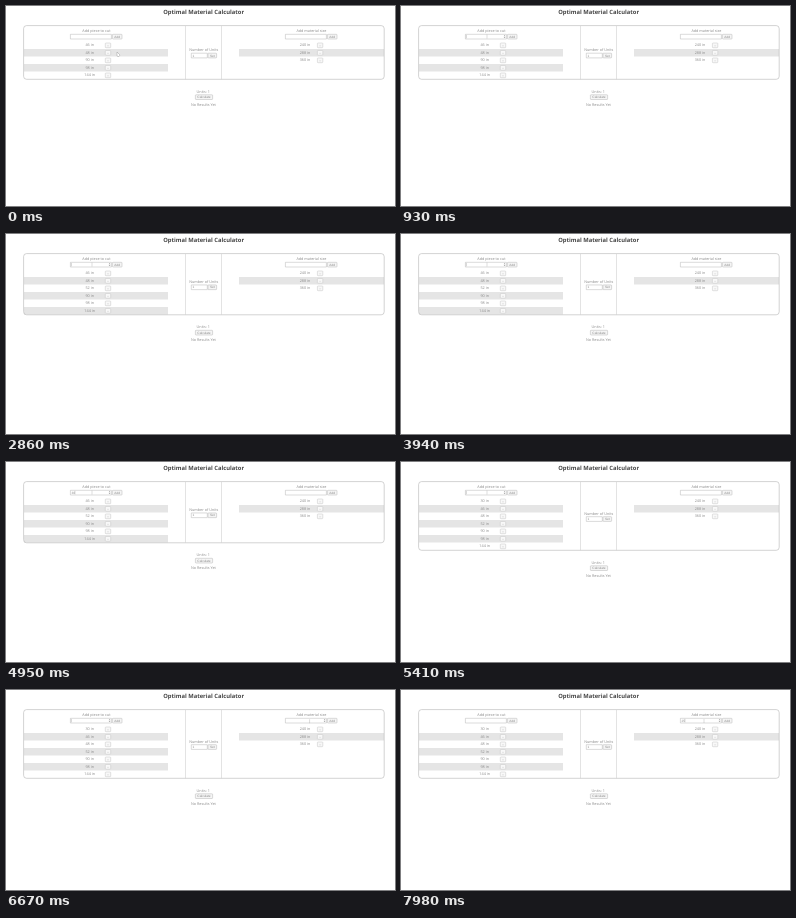
Write an HTML page with a canvas that moves like this. It is 389 px wide and 200 px high and loops after 8000 ms.

```html
<!DOCTYPE html>
<html lang="en">
<head>
<meta charset="utf-8">
<title>Optimal Material Calculator</title>
<style>
  html, body { margin: 0; width: 100%; height: 100%; overflow: hidden; background: #fff; }
  canvas { display: block; width: 389px; height: 200px; }
</style>
</head>
<body>
<canvas id="stage" width="389" height="200"></canvas>
<script>
const ctx = document.getElementById('stage').getContext('2d');
const LOOP = 8000;
const ROW = 7.5;
const BLINK = 530;
const POINTER_STEP = 79;
const UI_FONT = '"Open Sans", "Noto Sans", sans-serif';
const FORM_FONT = '"Liberation Sans", Arial, sans-serif';

const startPieces = [46, 48, 90, 98, 144];
const sizes = [240, 288, 360];
const pieceField = {
  x: 64.4, focus: 930, blur: 7060,
  entries: [
    { value: '52', keys: [2080, 2310], submit: 2860 },
    { value: '30', keys: [4650, 4950], submit: 5410 }
  ]
};
const sizeField = {
  x: 279.4, focus: 7060, blur: LOOP,
  entries: [{ value: '25', keys: [7750, 7980], submit: LOOP }]
};

function fieldState(field, t) {
  const { focus, blur, entries } = field;
  const focused = t >= focus && t < blur;
  const events = [focus, ...entries.flatMap(e => [...e.keys, e.submit])];
  const last = Math.max(...events.filter(time => time <= t));
  const entry = entries.find(e => t < e.submit);
  const typed = entry ? entry.keys.filter(key => key <= t).length : 0;
  return {
    focused,
    value: entry ? entry.value.slice(0, typed) : '',
    caret: focused && Math.floor((t - last) / BLINK) % 2 === 0
  };
}

function piecesAt(t) {
  const added = pieceField.entries.filter(e => e.submit <= t).map(e => +e.value);
  return [...startPieces, ...added].sort((a, b) => a - b);
}

function progress(t, start, duration) {
  const stepped = Math.floor((t - start) / POINTER_STEP + 1) * POINTER_STEP;
  const u = Math.min(1, Math.max(0, stepped / duration));
  return 1 - (1 - u) ** 3;
}

const bezier = (a, b, c, d, u) =>
  a * (1 - u) ** 3 + 3 * b * u * (1 - u) ** 2 + 3 * c * u * u * (1 - u) + d * u ** 3;

function pointerAt(t) {
  if (t < 6110) {
    const u = progress(t, 70, 400);
    return [111 - 25 * u, 46 - 15.5 * u];
  }
  const u = progress(t, 6110, 710);
  return [bezier(86, 200, 450, 303, u), bezier(30.5, 92, 92, 31, u)];
}

function text(str, x, y, { size = 3.75, color = '#888', align = 'center', font = UI_FONT, weight = 400 } = {}) {
  ctx.font = `${weight} ${size}px ${font}`;
  ctx.textAlign = align;
  ctx.fillStyle = color;
  ctx.fillText(str, x, y);
}

function rect(x, y, w, h, fill, stroke, radius = 0) {
  ctx.beginPath();
  ctx.roundRect(x, y, w, h, radius);
  if (fill) { ctx.fillStyle = fill; ctx.fill(); }
  if (stroke) { ctx.strokeStyle = stroke; ctx.stroke(); }
}

function line(x1, y1, x2, y2, color, width) {
  ctx.strokeStyle = color;
  ctx.lineWidth = width;
  ctx.beginPath();
  ctx.moveTo(x1, y1);
  ctx.lineTo(x2, y2);
  ctx.stroke();
}

function button(label, x, y, w) {
  ctx.lineWidth = 0.5;
  rect(x, y, w, 4.7, '#f5f5f5', '#b5b5b5', 0.6);
  text(label, x + w / 2, y + 2.5, { size: 3.2, font: FORM_FONT });
}

function input(x, y, w, value) {
  ctx.lineWidth = 0.5;
  rect(x, y, w, 4.7, '#fff', '#b5b5b5');
  text(value, x + 1.2, y + 2.5, { size: 3.2, align: 'left', font: FORM_FONT });
}

function spinner(x, y) {
  ctx.fillStyle = '#999';
  for (const dir of [-1, 1]) {
    ctx.beginPath();
    ctx.moveTo(x - 0.9, y + dir * 0.4);
    ctx.lineTo(x + 0.9, y + dir * 0.4);
    ctx.lineTo(x, y + dir * 1.5);
    ctx.fill();
  }
}

function addForm(label, field, t, hovered) {
  const { x } = field;
  const { value, focused, caret } = fieldState(field, t);
  text(label, x + 26, 25.2);
  input(x, 28.3, 41, value);
  button('Add', x + 42, 28.3, 9.6);
  if (focused || hovered) spinner(x + 39.2, 30.6);
  if (caret) {
    ctx.font = `3.2px ${FORM_FONT}`;
    const end = x + 1 + ctx.measureText(value).width;
    line(end, 28.9, end, 32.3, '#999', 0.4);
  }
}

function rows(values, stripeX, stripeW, textX, buttonX) {
  values.forEach((value, i) => {
    const y = 39.3 + i * ROW;
    if (i % 2) rect(stripeX, y - 3.8, stripeW, ROW, '#e5e5e5');
    text(`${value} in`, textX, y + 0.2);
    ctx.lineWidth = 0.5;
    rect(buttonX, y - 2.3, 5.4, 4.7, '#f8f8f8', '#c4c4c4', 0.6);
    line(buttonX + 1.7, y + 0.5, buttonX + 3.7, y + 0.5, '#ccc', 0.5);
  });
}

function drawPointer(x, y, beam) {
  if (beam) {
    line(x, y - 2, x, y + 2, '#aaa', 0.4);
    return;
  }
  ctx.beginPath();
  ctx.moveTo(x, y);
  ctx.lineTo(x, y + 4.1);
  ctx.lineTo(x + 1.9, y + 4.6);
  ctx.lineTo(x + 3, y + 3);
  ctx.closePath();
  ctx.lineWidth = 0.4;
  ctx.fillStyle = '#fff';
  ctx.fill();
  ctx.strokeStyle = '#888';
  ctx.stroke();
}

function draw(t) {
  const pieces = piecesAt(t);
  const growth = (pieces.length - startPieces.length) * ROW;
  const bottom = 73.3 + growth;
  const unitsY = 44.3 + growth / 2;
  const [px, py] = pointerAt(t);
  const isOver = field => py > 28 && py < 33.5 && px > field.x && px < field.x + 41;

  ctx.fillStyle = '#fff';
  ctx.fillRect(0, 0, 389, 200);
  ctx.textBaseline = 'middle';
  text('Optimal Material Calculator', 197.6, 6.9, { size: 5.8, color: '#444', weight: 700 });

  rows(pieces, 18, 144, 83.7, 99.3);
  rows(sizes, 233, 145, 299, 311.4);
  ctx.lineWidth = 0.6;
  rect(17.6, 19.6, 360.6, bottom - 19.6, null, '#b5b5b5', 3);
  for (const x of [179.5, 215.5]) line(x, 20, x, bottom, '#d0d0d0', 0.6);

  addForm('Add piece to cut', pieceField, t, isOver(pieceField));
  addForm('Add material size', sizeField, t, isOver(sizeField));

  text('Number of Units', 197.7, unitsY);
  input(185.3, unitsY + 2.9, 16, '1');
  button('Set', 202, unitsY + 2.9, 8.6);

  text('Units: 1', 197.2, bottom + 12.5);
  button('Calculate', 189.4, bottom + 15.5, 17.2);
  text('No Results Yet', 197.4, bottom + 25.7);

  drawPointer(px, py, isOver(pieceField) || isOver(sizeField));
}

function tick(now) {
  draw(now % LOOP);
  requestAnimationFrame(tick);
}

ctx.textRendering = 'geometricPrecision';
draw(0);
requestAnimationFrame(tick);
</script>
</body>
</html>
```
